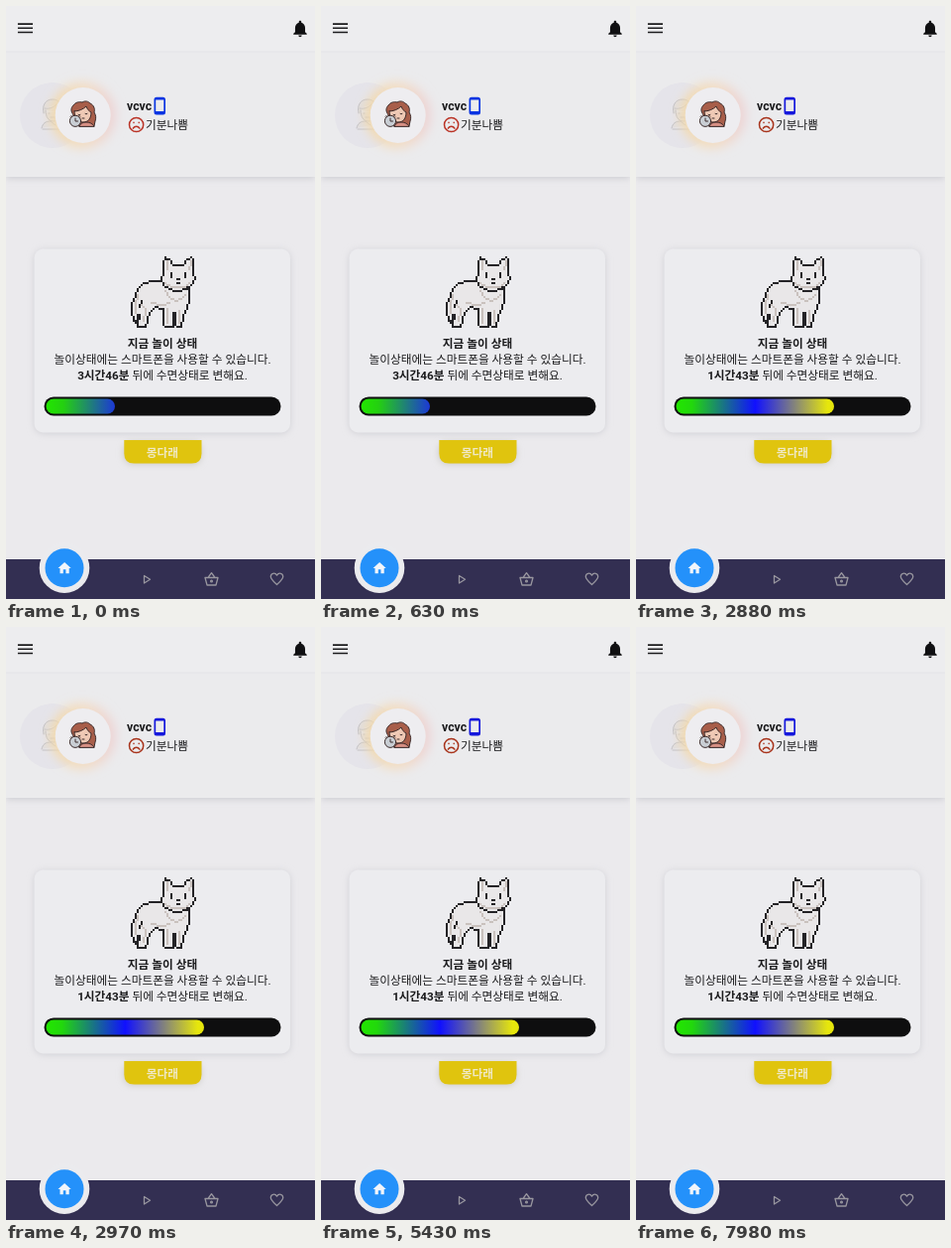
These frames come from a looping animation (312x597 px, 8 s). An HTML page:

```html
<!DOCTYPE html>
<html lang="ko">
<head>
<meta charset="utf-8">
<title>놀이 상태</title>
<style>
  html, body { margin: 0; width: 100%; height: 100%; overflow: hidden; background: #ebeaed; }
  svg { display: block; width: 100%; height: 100%; }
  text { font: 11.7px Roboto, "Noto Sans CJK KR", "Noto Sans CJK", sans-serif; fill: #1a1a1c; }
  .bold { font-weight: 700; }
  .mid { text-anchor: middle; }
  .line { fill: none; stroke-linecap: round; stroke-linejoin: round; }
</style>
</head>
<body>
<svg viewBox="0 0 312 597" xmlns="http://www.w3.org/2000/svg">
  <defs>
    <filter id="soft" x="-30%" y="-30%" width="160%" height="160%"><feGaussianBlur stdDeviation="3.5"/></filter>
    <filter id="glow" x="-50%" y="-50%" width="200%" height="200%"><feGaussianBlur stdDeviation="5.5"/></filter>
    <linearGradient id="halo">
      <stop offset="0" stop-color="#f3d9a8"/>
      <stop offset=".55" stop-color="#f3dcc2"/>
      <stop offset="1" stop-color="#ecd0d6"/>
    </linearGradient>
    <linearGradient id="early">
      <stop offset="0" stop-color="#22e600"/>
      <stop offset=".25" stop-color="#24d010"/>
      <stop offset="1" stop-color="#1c38d6"/>
    </linearGradient>
    <linearGradient id="late">
      <stop offset="0" stop-color="#22e600"/>
      <stop offset=".1" stop-color="#22d80c"/>
      <stop offset=".5" stop-color="#1010ff"/>
      <stop offset=".96" stop-color="#e6e60c"/>
    </linearGradient>
  </defs>

  <!-- header and profile panel -->
  <rect y="60" width="312" height="113" fill="#c8c8ce" filter="url(#soft)"/>
  <rect width="312" height="172" fill="#ebebed"/>
  <rect width="312" height="46" fill="#ededef"/>
  <rect y="45.5" width="312" height="1" fill="#e4e4e7"/>
  <path transform="translate(9.4 12.2) scale(.84)" fill="#1c1c1e" d="M3 18h18v-2H3zM3 13h18v-2H3zM3 6v2h18V6z"/>
  <path transform="translate(286.9 12.7) scale(.84)" fill="#101012" d="M12 22c1.1 0 2-.9 2-2h-4c0 1.1.9 2 2 2zm6-6v-5c0-3.07-1.63-5.64-4.5-6.32V4c0-.83-.67-1.5-1.5-1.5s-1.5.67-1.5 1.5v.68C7.64 5.36 6 7.92 6 11v5l-2 2v1h16v-1l-2-2z"/>

  <!-- avatars -->
  <circle cx="47" cy="110" r="33" fill="#e5e4ea"/>
  <g class="line" stroke="#c2c1c6">
    <path d="M38 108c-2-8 2-14 9-14s9 5 9 12M39 103c5 1 9-1 12-4M40 105c0 7 3 11 8 11s7-4 7-9M36 123c1-5 4-7 9-7l5 4" fill="#e1dedf"/>
    <path d="M37 124h20M43 108h1M50 108h1M45 112h4"/>
  </g>
  <circle cx="77.7" cy="110" r="33" fill="url(#halo)" filter="url(#glow)"/>
  <circle cx="77.7" cy="110" r="28" fill="#eeedf0"/>
  <g stroke="#3c2c2c" stroke-linejoin="round" stroke-linecap="round">
    <path d="M67 108c-2-3-1-6 1-8 2-3 6-4 9-3 3-2 6-1 8 1 4 2 5 6 4 9 2 3 2 6 1 9l-1 5H74z" fill="#a85e4a"/>
    <path d="M69 106c4 0 9-2 12-5 1 3 3 5 5 6 0 6-3 10-8 10-5 0-9-5-9-11z" fill="#efc9b5"/>
    <path d="M74 121c1-3 4-4 7-4s6 1 8 4z" fill="#d99084"/>
    <path d="M73 109.500q1 1 2 0M80 108.500q1 1 2 0M77 113h2" fill="none"/>
    <circle cx="70" cy="115.800" r="5.600" fill="#c9ced4"/>
    <path d="M70 113v3h2.500M66 110.500l-.8.800M74 110.500l.8.800" fill="none"/>
  </g>
  <text class="bold" x="122" y="105.300" style="font-size:12.3px">vcvc</text>
  <path id="phone" fill-rule="evenodd" d="M152 91.800h6.500q2.500 0 2.500 2.500v12.700q0 2.500-2.500 2.500h-6.500q-2.500 0-2.500-2.500v-12.700q0-2.500 2.500-2.500zM151.200 94.500v11.500h8.100v-11.500z"/>
  <g id="mood" class="line" stroke-width="1.500">
    <circle cx="131.600" cy="119.500" r="7.100"/>
    <path d="M129 117.300v.2M134.200 117.300v.2M128.300 123.200c1.500-2.500 5.100-2.500 6.600 0"/>
  </g>
  <text x="141" y="123.700">기분나쁨</text>

  <!-- status card -->
  <rect x="119" y="439" width="78" height="22" rx="8" fill="#cbc9c4" filter="url(#soft)"/>
  <path d="M119.300 437h78.200v13.500q0 10-10 10h-58.200q-10 0-10-10z" fill="#e0c40e"/>
  <text class="bold mid" x="158" y="453.500" style="fill:#efe8c4">몽다래</text>
  <rect x="28.500" y="245.500" width="258.500" height="185" rx="9" fill="#d0d0d5" filter="url(#soft)"/>
  <rect x="28.500" y="244.500" width="258.500" height="185" rx="9" fill="#ececef"/>
  <g id="dog" shape-rendering="crispEdges"></g>
  <text class="bold mid" x="158" y="344">지금 놀이 상태</text>
  <text class="mid" x="158" y="360">놀이상태에는 스마트폰을 사용할 수 있습니다.</text>
  <text class="mid" x="158" y="376"><tspan class="bold" id="left"></tspan> 뒤에 수면상태로 변해요.</text>
  <rect x="38.500" y="393.500" width="239" height="19" rx="9.500" fill="#0e0e0f"/>
  <rect id="fill" x="40.500" y="395.500" height="15" rx="7.500"/>

  <!-- bottom navigation -->
  <rect y="557" width="312" height="40" fill="#332f52"/>
  <circle cx="59" cy="565.700" r="25.300" fill="#ebebee"/>
  <circle cx="59" cy="565.700" r="19.500" fill="#2491fa"/>
  <path transform="translate(51.200 558) scale(.66)" fill="#f2f5fa" d="M10 20v-6h4v6h5v-8h3L12 3 2 12h3v8z"/>
  <g class="line" stroke="#98969f" stroke-width="1.300">
    <path d="M139.500 573.500v7.500l6-3.750z"/>
    <path d="M201 575.500h13l-2 7.500h-9zM204 575.500l3.500-4.800 3.500 4.800"/>
    <circle cx="207.500" cy="579" r=".9"/>
    <path d="M273.500 582.500c-4-3.500-6.200-5.300-6.200-7.900 0-3.800 4.400-4.500 6.200-1.500 1.800-3 6.200-2.300 6.200 1.500 0 2.600-2.200 4.400-6.200 7.900z"/>
  </g>
</svg>
<script>
const $ = id => document.getElementById(id);
const LOOP = 8000, SWITCH = 2280, TINT = 2880, CELL = 2;

function addPath(d, color) {
  const p = document.createElementNS("http://www.w3.org/2000/svg", "path");
  p.setAttribute("d", d);
  p.setAttribute("fill", color);
  $("dog").append(p);
}

const pairs = s => s.split(" ").map(p => p.split(",").map(Number));

// Draws a polyline as square cells.
function pixelLine(shape, color) {
  const pts = pairs(shape);
  let d = "";
  pts.slice(1).forEach(([x2, y2], i) => {
    const [x1, y1] = pts[i];
    const n = Math.max(1, Math.ceil(Math.max(Math.abs(x2 - x1), Math.abs(y2 - y1)) / CELL));
    for (let k = 0; k <= n; k++) {
      const x = Math.round((x1 + (x2 - x1) * k / n) / CELL) * CELL;
      const y = Math.round((y1 + (y2 - y1) * k / n) / CELL) * CELL;
      d += `M${x} ${y}h${CELL}v${CELL}h-${CELL}z`;
    }
  });
  addPath(d, color);
}

function pixelShape(shape, fill) {
  addPath("M" + shape.split(" ").join("L") + "z", fill);
  pixelLine(shape + " " + shape.split(" ")[0], "#242326");
}

function drawDog() {
  const white = "#e9e7e8", shade = "#c9c1bd", ink = "#242326";
  // body, tail and legs
  pixelShape("156,276 146,276 138,278 132,284 130,290 126,298 126,308 128,316 130,318 132,310 134,310 132,318 132,322 140,322 142,314 144,308 150,302 158,304 158,320 160,322 168,322 168,308 170,308 170,320 172,322 176,322 178,312 182,302 184,294 184,284 170,280", white);
  pixelLine("132,290 130,300 130,308", shade);
  pixelLine("136,300 140,304 138,316", shade);
  pixelLine("146,298 158,300 164,298", shade);
  pixelLine("162,304 162,318", shade);
  pixelLine("174,306 174,318", shade);
  pixelLine("160,286 164,292 172,296 180,290", shade);
  pixelLine("134,302 136,296", ink);
  // head
  pixelShape("156,274 158,268 158,256 160,252 164,254 168,260 178,260 182,254 186,252 188,256 188,268 190,274 186,280 180,284 172,286 164,284 158,280", white);
  pixelLine("162,256 162,264", shade);
  pixelLine("186,256 184,264", shade);
  pixelLine("160,278 166,282 180,282 184,278", shade);
  pixelLine("166,268 166,272", ink);
  pixelLine("180,268 180,272", ink);
  pixelLine("172,274 174,274", ink);
  pixelLine("172,278 174,278", ink);
}

function draw(t) {
  const late = t >= SWITCH, warm = t >= TINT;
  $("left").textContent = late ? "1시간43분" : "3시간46분";
  $("fill").setAttribute("width", late ? 159.5 : 69.5);
  $("fill").setAttribute("fill", late ? "url(#late)" : "url(#early)");
  $("phone").setAttribute("fill", warm ? "#1518dc" : "#0834e2");
  $("mood").setAttribute("stroke", warm ? "#a8341c" : "#ba3326");
}

drawDog();
const start = performance.now();
function tick() {
  draw((performance.now() - start) % LOOP);
  requestAnimationFrame(tick);
}
tick();
</script>
</body>
</html>
```
